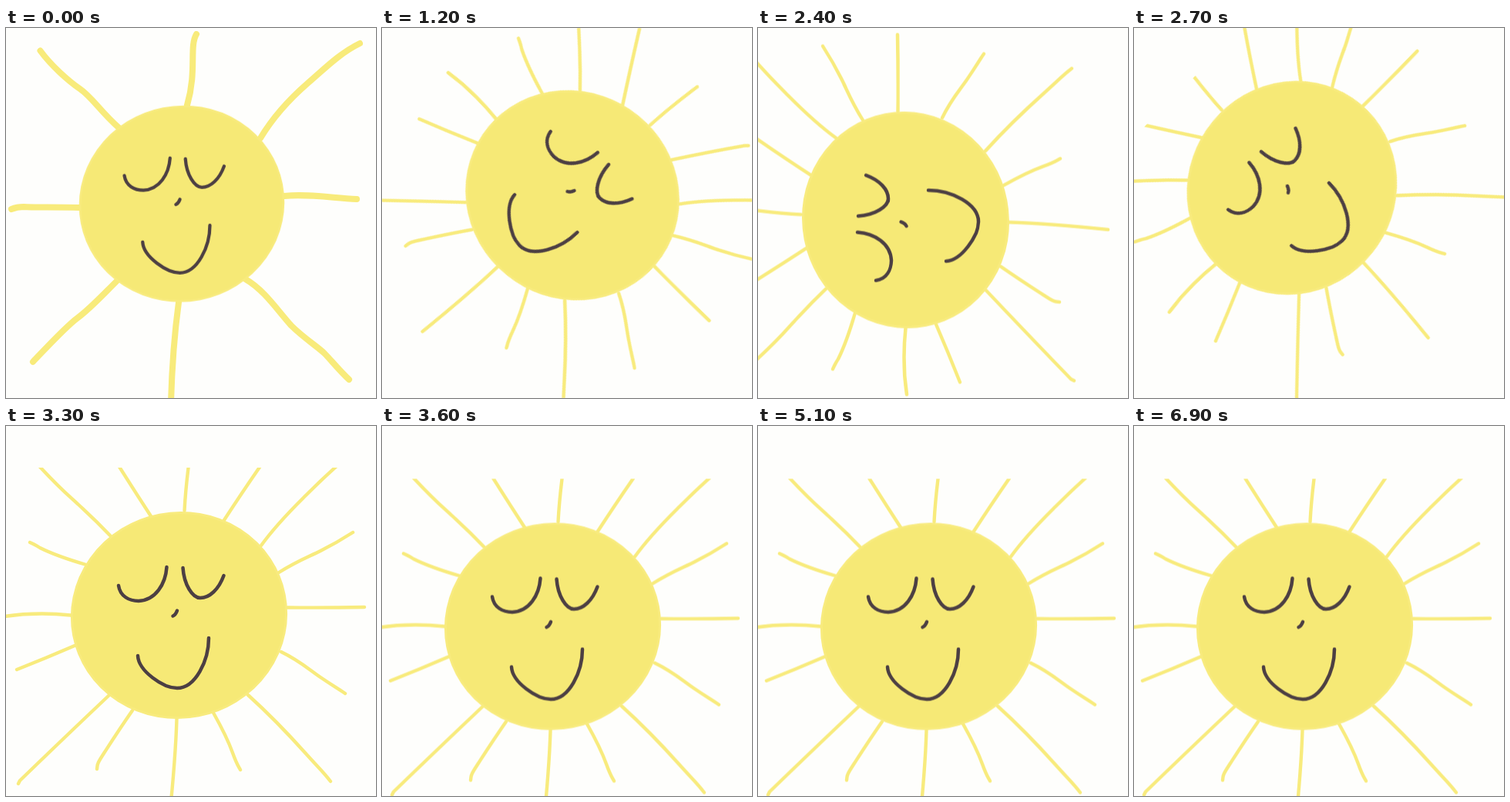
Recreate the animation shown at these times as an HTML page without scripts. Size 480 by 480 pixels, loop 7200 ms.

```html
<!DOCTYPE html>
<html lang="en">
<head>
<meta charset="utf-8">
<title>Rolling sun</title>
<style>
html, body { margin: 0; width: 100%; height: 100%; overflow: hidden; background: #fefefc; }
svg { display: block; width: 100%; height: 100%; }
path { fill: none; stroke-linecap: round; stroke-linejoin: round; }
.thin { stroke: #f8eb7d; stroke-width: 4.4; }
.thick { stroke: #f8eb7b; stroke-width: 8; }
.face { stroke: #4c3f43; stroke-width: 4.5; }
.disc { fill: #f6e976; stroke: #f8eb7e; stroke-width: 3; }
.pose, .show { animation: 7.2s step-end infinite; }
.pose { transform-origin: 0 0; animation-name: pose; }
.first { animation-name: first; }
.main { animation-name: main; }
.extra { animation-name: extra; }
.roll { animation-name: roll; }
.bold { animation-name: bold; }
.rest { animation-name: rest; }

/* small drawing, then eighth turns, then a bounce */
@keyframes pose {
  0% { transform: translate(228px, 228px) scale(.948); }
  16.66% { transform: translate(247px, 217px) rotate(45deg); }
  20.83% { transform: translate(249px, 239px) rotate(90deg); }
  25% { transform: translate(251.3px, 261.8px) rotate(180deg); }
  29.16% { transform: translate(222px, 252px) rotate(225deg); }
  33.33% { transform: translate(191.5px, 249px) rotate(270deg); }
  37.5% { transform: translate(204.9px, 207.4px) rotate(315deg); }
  41.66% { transform: translate(224.5px, 245.5px); }
  50% { transform: translate(221.5px, 260px); }
  54.16% { transform: translate(224.5px, 245.5px); }
  58.33%, 100% { transform: translate(221.5px, 260px); }
}
@keyframes first { 0% { opacity: 1; } 4.16%, 100% { opacity: 0; } }
@keyframes main { 0% { opacity: 0; } 4.16% { opacity: 1; } 16.66%, 100% { opacity: 0; } }
@keyframes extra { 0% { opacity: 0; } 8.33% { opacity: 1; } 16.66%, 100% { opacity: 0; } }
@keyframes roll { 0% { opacity: 0; } 16.66% { opacity: 1; } 33.33%, 100% { opacity: 0; } }
@keyframes bold {
  0% { opacity: 0; } 41.66% { opacity: 1; } 45.83% { opacity: 0; }
  54.16% { opacity: 1; } 58.33%, 100% { opacity: 0; }
}
@keyframes rest {
  0% { opacity: 0; } 33.33% { opacity: 1; } 41.66% { opacity: 0; }
  45.83% { opacity: 1; } 54.16% { opacity: 0; } 58.33%, 100% { opacity: 1; }
}
</style>
</head>
<body>
<svg viewBox="0 0 480 480">
  <defs>
    <path id="long" d="M231.500 110Q233 78 239.500 31.500
      M331 155C352 126 375 104 390 89S430 50 455 30
      M365 235.500Q415 236 465 235
      M314 349C345 377 372 406 389 425S412 449 421 461
      M221.500 380Q220 430 212 508
      M133 350Q78 402 18 460L16 464
      M84 245.500Q40 241 -2 247
      M135 142C116 122 108 115 94 102S68 80 34 42"/>
    <path id="short" d="M283 122Q311 79 337 42L340.500 38.500
      M354 190C378 175 392 170 408 162S436 147 450 138
      M357 293C380 304 392 315 408 326S430 340 440 347
      M269 372C278 388 289 410 294 424S300 439 304 446
      M164 369C148 392 139 406 128 423S119 438 118 445
      M89 285Q52 301 14 316
      M104 180C80 173 60 166 44 158Q36 153 31 151
      M188 117Q162 77 133.500 31.500"/>
    <clipPath id="top"><rect x="-20" y="54" width="520" height="480"/></clipPath>
    <clipPath id="turned">
      <rect width="480" height="480" transform="translate(224.500 245.500) rotate(-45) translate(-247 -217)"/>
    </clipPath>
  </defs>

  <rect width="480" height="480" fill="#fefefc"/>

  <path class="thick show first" d="M147 130C122 108 112 90 96 79S58 48 44.500 29.500
    M235 100C245 66 241 40 243 22Q244 13 247 8
    M330 143C345 118 368 92 391 72C410 56 432 33 459 20
    M361 218C390 215 420 220 455 222
    M311 326C335 340 352 366 370 386C386 402 405 414 413 422S433 445 445 456
    M224 356Q216 415 214 485
    M143 329C120 352 108 365 93 376S55 412 35 433
    M95 233C65 232 35 233 23 232Q14 232 7 235"/>

  <g class="pose">
    <g transform="translate(-224.500 -245.500)">
      <g class="thin">
        <use href="#long" class="show main"/>
        <use href="#short" class="show extra"/>
        <g class="show roll"><g clip-path="url(#turned)"><use href="#long"/><use href="#short"/></g></g>
        <g class="show rest"><g clip-path="url(#top)"><use href="#long"/><use href="#short"/></g></g>
      </g>
      <path class="thick show bold" d="M232 108C233 80 238 44 248 18
        M283 122C293 98 318 72 346 36
        M332 155C350 126 375 101 391 88S417 62 431 50
        M357 190C377 175 392 167 406 160S440 141 460 132
        M366 237Q418 235 470 235
        M357 294C384 302 396 315 412 325S430 341 445 345
        M315 352C350 390 385 422 428 467
        M269 374C281 396 296 422 310 455
        M221 382Q215 430 212 490
        M165 371C144 394 128 427 104 463
        M130 351C100 379 80 394 64 409S35 442 10 466
        M86 286C64 292 40 306 10 318
        M83 247C58 242 30 248 -5 245
        M102 179C78 166 45 158 12 149
        M137 139C110 119 96 99 76 82S42 57 23 38
        M186 113C174 90 160 74 151 58S138 33 125 23"/>
      <ellipse class="disc" rx="139.300" ry="132.800" transform="translate(224.500 245.500) rotate(-11)"/>
      <path class="face" d="M146 207C148 221 160 227 172 227C194 226 207 205 208.500 183
        M229.500 184C231 206 242 223 252 223C264 223 276 212 282.500 194
        M222 239.500Q220 245 216.500 246.500
        M171 298C172 318 204 340 222 340C246 340 263 304 263 275"/>
    </g>
  </g>
</svg>
</body>
</html>
```
